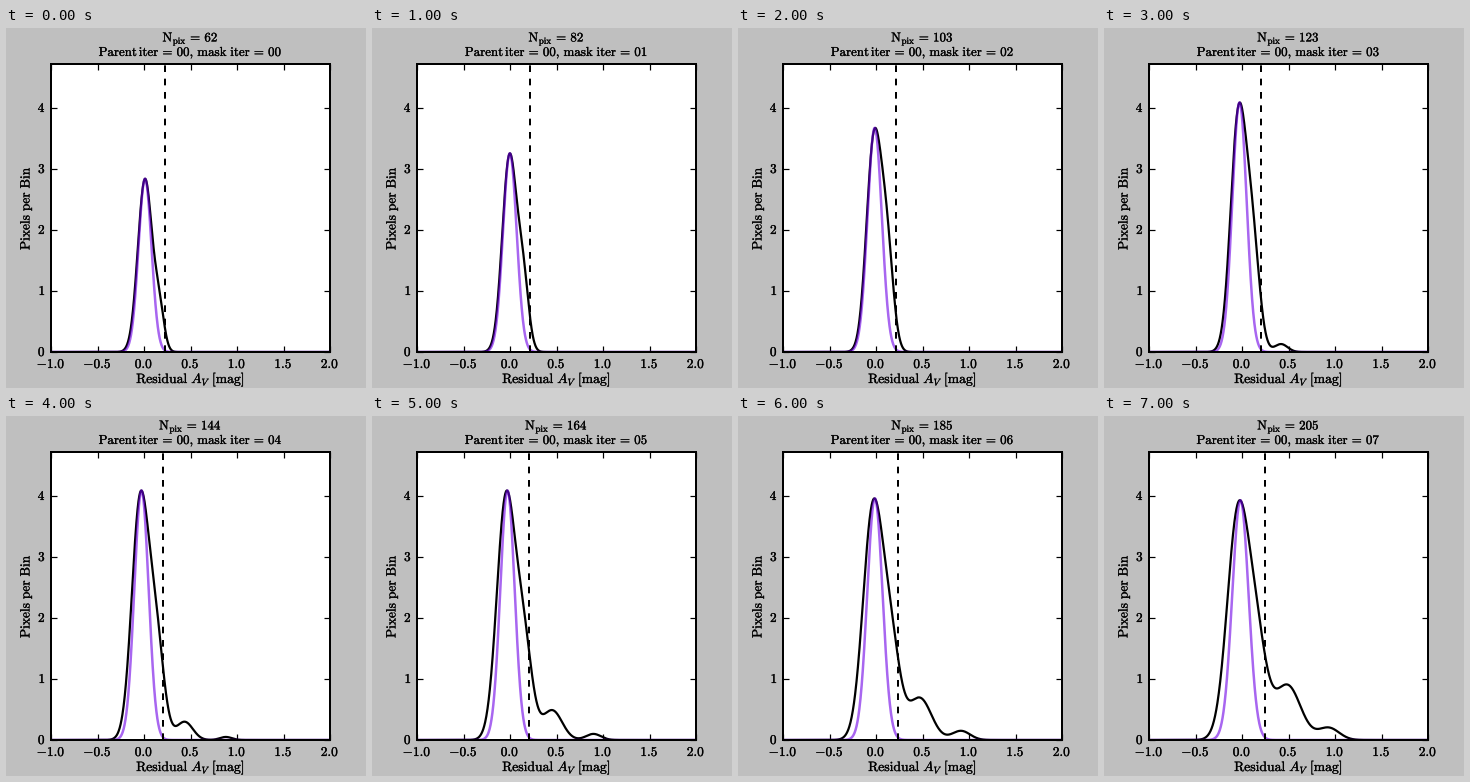
Write a matplotlib script that moves like this. It is 360 px wide and 360 px high and loops after 8 s.

```python
import numpy as np
import matplotlib.pyplot as plt
from matplotlib.animation import FuncAnimation
from matplotlib.patheffects import withStroke

SIZE, DPI, STEPS = 360, 80, 8
plt.rcParams["mathtext.fontset"] = "cm"

fig = plt.figure(figsize=(SIZE / DPI, SIZE / DPI), dpi=DPI, facecolor="0.75")
ax = fig.add_axes([0.125, 0.1, 0.775, 0.8])
ax.set(xlim=(-1, 2), ylim=(0, 288 / 61),
       xticks=np.arange(-1, 2.1, 0.5), yticks=range(5))
ax.tick_params(direction="in", top=True, right=True, length=5, width=1.1,
               labelbottom=False, labelleft=False)
for spine in ax.spines.values():
    spine.set_linewidth(1.8)


def roman(text):
    return rf"$\mathrm{{{text}}}$"


def label(x, y, text, size=12, ha="center", **kw):
    """Place roman math text with its baseline at a pixel, y downward."""
    return fig.text(x / SIZE, 1 - y / SIZE, roman(text), size=size, ha=ha,
                    va="baseline", **kw,
                    path_effects=[withStroke(linewidth=0.25,
                                             foreground="black")])


for v in ax.get_xticks():
    label(45 + 93 * (v + 1), 340, f"{v:.1f}")
for v in range(5):
    label(40, 328 - 61 * v, str(v), ha="right")
label(184.5, 355, r"Residual\ \mathit{A_V}\ [mag]", 12.3)
label(23.5, 180, r"Pixels\ per\ Bin", 12.1, rotation=90,
      rotation_mode="anchor")
count = label(184.5, 13.5, "N", 11.65)
status = label(184.5, 28, "P", 11.65)

x = np.linspace(-1, 2, 1200)
density, = ax.plot([], [], color="black", lw=2)
fit, = ax.plot([], [], color=(0.43, 0, 0.9), alpha=0.6, lw=2.25)
cut = ax.axvline(0, color="black", lw=1.8)
cut.set_linestyle((0, (6 / 1.8, 6 / 1.8)))


def bell(centre, width):
    return np.exp(-0.5 * ((x - centre) / width) ** 2)


def main_peak(n):
    """Height, centre and width of the gaussian fitted to the main peak."""
    height = np.interp(n, [0, 3, 5, 6, 7], [2.84, 4.09, 4.09, 3.96, 3.93])
    centre = np.interp(n, [0, 3, 5, 6, 7], [.011, -.027, -.027, -.012, -.017])
    width = np.interp(n, [0, 2, 5, 7], [0.070, 0.077, 0.077, 0.088])
    return height, centre, width


def density_curve(n, height, centre):
    """Main peak with a right shoulder, then two bumps that grow in later."""
    share = np.interp(n, [0, 2, 7], [0.23, 0.46, 0.41])
    shoulder = np.interp(n, [0, 2, 3, 6], [0.165, 0.118, 0.112, 0.155])
    body = bell(centre - 0.004 * n, 0.077 + 0.0008 * n ** 2)
    body += share * bell(shoulder, 0.052 + 0.008 * n)
    curve = height * body / body.max()
    if n > 2:
        curve += 0.13 * (n - 2) ** 1.2 * bell(0.369 + 0.017 * n,
                                              0.016 + 0.018 * n)
    if n > 3:
        curve += 0.05 * (n - 3) * bell(0.812 + 0.017 * n, 0.001 + 0.016 * n)
    return curve


def update(n):
    height, centre, width = main_peak(n)
    density.set_data(x, density_curve(n, height, centre))
    fit.set_data(x, height * bell(centre, width))
    cut.set_xdata([centre + 3 * width] * 2)
    pixels = int(20.5 * (n + 3) + 0.5)
    count.set_text(roman(rf"N_{{pix}}\,=\,{pixels}"))
    status.set_text(roman(
        rf"Parent\,iter\,=\,00,\,mask\ iter\,=\,{n:02d}"))
    return density, fit, cut, count, status


anim = FuncAnimation(fig, update, frames=STEPS, interval=1000,
                     repeat=True, repeat_delay=0)
plt.show()
```
